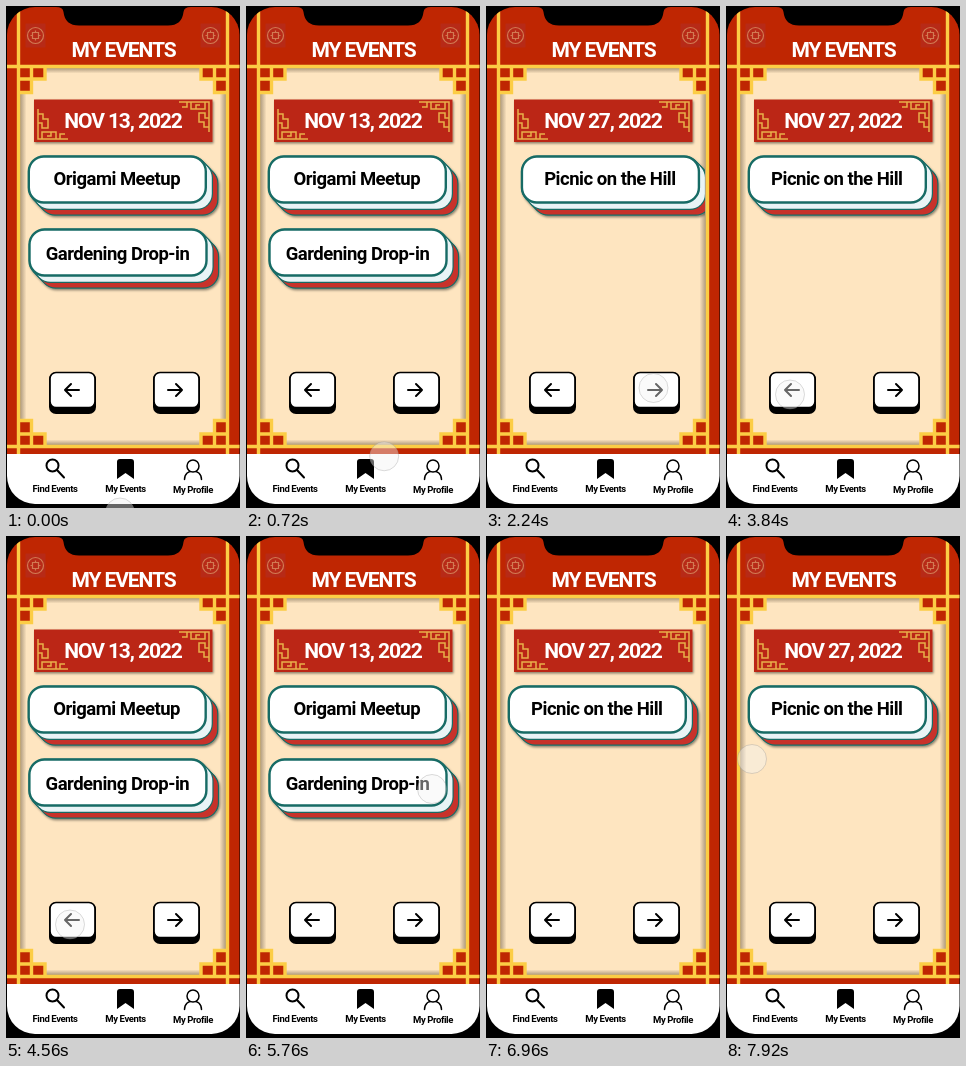
Animation of 234x502 px, one loop 8 s. Source, as an HTML page:

```html
<!DOCTYPE html>
<html lang="en">
<head>
<meta charset="utf-8">
<title>My Events</title>
<style>
html, body { margin: 0; width: 100%; height: 100%; overflow: hidden; background: #000; }
svg { display: block; width: 234px; height: 502px; }
text { font-family: Roboto, "Liberation Sans", sans-serif; font-weight: bold; text-anchor: middle; }
.head { font-size: 21px; fill: #fff; letter-spacing: -1.1px; }
.card { font-size: 18.5px; letter-spacing: -.5px; }
.nav { font-size: 9.5px; letter-spacing: -.4px; }
.gold { fill: none; stroke: #fccd45; stroke-width: 3.4; }
.fret { fill: none; stroke: #e9b04a; stroke-width: 1.5; }
.coin { fill: none; stroke: #d27a52; stroke-width: 1.2; }
.ink { fill: none; stroke: #000; stroke-width: 2; stroke-linecap: round; stroke-linejoin: round; }
.thin { stroke-width: 1.5; }
</style>
</head>
<body>
<svg viewBox="0 0 234 502">
  <defs>
    <clipPath id="phone"><rect x="1" y="1" width="232.500" height="497" rx="28"/></clipPath>
    <clipPath id="pane"><rect x="14" y="140" width="205" height="160"/></clipPath>
    <linearGradient id="edgeX">
      <stop offset="0" stop-color="#6b5a45" stop-opacity=".6"/>
      <stop offset="1" stop-color="#6b5a45" stop-opacity="0"/>
    </linearGradient>
    <linearGradient id="edgeY" x2="0" y2="1">
      <stop offset="0" stop-color="#6b5a45" stop-opacity=".6"/>
      <stop offset="1" stop-color="#6b5a45" stop-opacity="0"/>
    </linearGradient>
    <filter id="soft" x="-20%" y="-40%" width="140%" height="190%">
      <feDropShadow dx="1" dy="1.5" stdDeviation="1.1" flood-opacity=".45"/>
    </filter>
    <g id="corner">
      <path d="M12 60H39V73H26V87H12Z" fill="#bf2602"/>
      <path class="gold" d="M12.5 86.500H25.500V60.500M12.500 73H39V60.500"/>
    </g>
    <g id="coin">
      <rect x="-10" y="-12" width="20" height="24" fill="#b72a17"/>
      <circle class="coin" r="8"/>
      <path class="coin" d="M-3 -3H3V3H-3ZM-5 0H-3M3 0H5M0 -5V-3M0 3V5"/>
    </g>
    <path id="fret" class="fret" d="M32 103V133H62M32 108H37V113H42V122H36V117H32M36 133V126H45V130H41M45 126H50V133M54 133V128H59"/>
    <g id="button">
      <rect x="43" y="366.500" width="47" height="41.500" rx="7"/>
      <rect x="44" y="366.500" width="45" height="35" rx="6" fill="#fff" stroke="#000" stroke-width="1.7"/>
    </g>
    <path id="arrow" class="ink" d="M73 384H59M65 378L59 384L65 390"/>
  </defs>

  <rect width="234" height="502"/>
  <g clip-path="url(#phone)">
    <rect width="234" height="448" fill="#bf2602"/>
    <rect x="12.5" y="60.500" width="209" height="380" fill="#fee5c0"/>
    <g id="edges"></g>
    <g id="corners"></g>
    <path class="gold" d="M12.500 0V448M221.500 0V448M0 60.500H234M0 440.500H234"/>
    <use href="#coin" x="29.500" y="29.500"/>
    <use href="#coin" x="204.500" y="29.500"/>
    <text class="head" x="117.5" y="51">MY EVENTS</text>

    <rect x="28" y="93.500" width="178.500" height="42.500" fill="#bb2815" filter="url(#soft)"/>
    <use href="#fret"/>
    <use href="#fret" transform="rotate(180 117.500 114.500)"/>
    <text id="date" class="head" x="117" y="122"></text>

    <g clip-path="url(#pane)"><g id="pageA"></g><g id="pageB"></g></g>

    <use href="#button"/>
    <use href="#button" x="104"/>
    <use href="#arrow"/>
    <use href="#arrow" transform="translate(235) scale(-1 1)"/>

    <rect y="448" width="234" height="54" fill="#fff"/>
    <circle class="ink" cx="46.500" cy="459.500" r="6"/>
    <path class="ink" d="M51 464L58 471.500"/>
    <path d="M111 473V456Q111 453 114 453H125Q128 453 128 456V473L119.500 467Z"/>
    <path class="ink thin" d="M178.500 473.500C178.500 462 195.500 462 195.500 473.500"/>
    <circle class="ink thin" cx="187" cy="460" r="6" style="fill:#fff"/>
    <text class="nav" x="49" y="486">Find Events</text>
    <text class="nav" x="119.500" y="486">My Events</text>
    <text class="nav" x="187" y="487">My Profile</text>
  </g>
  <path d="M50 0V1Q57 1 57.500 6Q59 19.500 73 19.500H162Q176 19.500 177.500 6Q178 1 185 1V0Z"/>
  <circle id="cursor" r="14.500" fill="#f2f2f2" fill-opacity=".42" stroke="#888" stroke-opacity=".3"/>
</svg>
<script>
const LOOP = 8000, PAGE_WIDTH = 215;
const get = id => document.getElementById(id);

// Card: a teal silhouette with red and pale layers pushed out behind a white face.
function card(x, y, label, baseline) {
  const layer = (d, fill, extra = "") =>
    `<rect x="${x + d}" y="${y + d * 1.05}" width="177" height="46" rx="15" fill="${fill}" ${extra}/>`;
  const stack = (from, to, fill, extra) => {
    let out = "";
    for (let d = from; d >= to; d--) out += layer(d, fill, extra);
    return out;
  };
  const teal = 'stroke="#176b65" stroke-width="2.4"';
  return `<g filter="url(#soft)">${stack(11.5, 0, "#176b65", teal)}</g>` +
    stack(11.5, 6, "#c8322b") + layer(6, "#176b65", teal) + stack(6, 1, "#e9f4f6") +
    layer(0, "#fff", teal) + `<text class="card" x="${x + 88}" y="${baseline}">${label}</text>`;
}
get("pageA").innerHTML = card(22.8, 150.5, "Origami Meetup", 179) + card(23.5, 223.5, "Gardening Drop-in", 254);
get("pageB").innerHTML = card(22.8, 150.5, "Picnic on the Hill", 179);

const mirrors = ["", "translate(234) scale(-1 1)", "translate(0 501) scale(1 -1)", "translate(234 501) scale(-1 -1)"];
get("corners").innerHTML = mirrors.map(m => `<use href="#corner" transform="${m}"/>`).join("");
get("edges").innerHTML = [mirrors[0], mirrors[3]].map(m => `<g transform="${m}">
  <rect x="13.5" y="61" width="7" height="379" fill="url(#edgeX)"/>
  <rect x="13" y="61.5" width="208" height="6" fill="url(#edgeY)"/></g>`).join("");

// Time, x, y
const cursorPath = [
  [0, 114, 506.5], [300, 114, 506.5], [1200, 167.5, 382], [2900, 167.5, 382],
  [3600, 64, 388.5], [4880, 64, 388.5], [5600, 186, 253], [5850, 186, 253],
  [6350, -20, 240], [7350, -20, 226], [7760, 26, 223], [8000, 26, 223]
];
// Start time, duration, page to show
const turns = [[1950, 480, 1], [4120, 480, 0], [5930, 480, 1]];

const smooth = p => p * p * (3 - 2 * p);
const easeOut = p => 1 - (1 - p) ** 3;

function cursorAt(t) {
  const i = cursorPath.findIndex(k => k[0] > t);
  const [t0, x0, y0] = cursorPath[i - 1], [t1, x1, y1] = cursorPath[i];
  const p = smooth((t - t0) / (t1 - t0));
  return [x0 + (x1 - x0) * p, y0 + (y1 - y0) * p];
}

function draw(t) {
  let page = 0, position = 0;
  for (const [start, duration, target] of turns) {
    if (t < start) break;
    const p = easeOut(Math.min(1, (t - start) / duration));
    position = page + (target - page) * p;
    page = target;
  }
  get("pageA").setAttribute("transform", `translate(${-position * PAGE_WIDTH})`);
  get("pageB").setAttribute("transform", `translate(${(1 - position) * PAGE_WIDTH})`);
  get("date").textContent = page ? "NOV 27, 2022" : "NOV 13, 2022";
  get("cursor").setAttribute("transform", `translate(${cursorAt(t)})`);
}

const begin = performance.now();
function frame() {
  draw((performance.now() - begin) % LOOP);
  requestAnimationFrame(frame);
}
frame();
</script>
</body>
</html>
```
